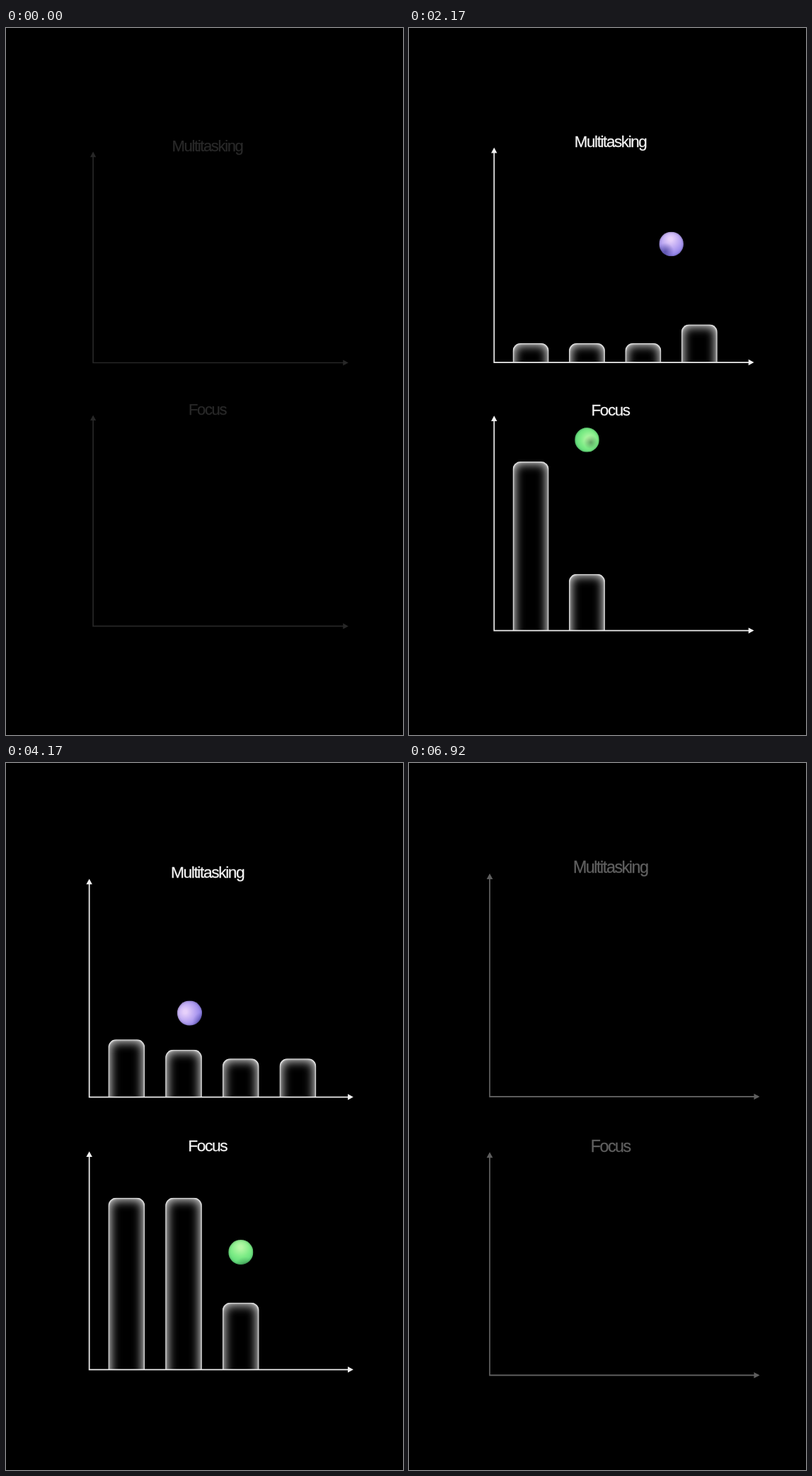
Animation, 561 px wide and 998 px high, one loop 7 s. Source, as an HTML page:

```html
<!DOCTYPE html>
<html lang="en">
<head>
<meta charset="utf-8">
<title>Multitasking and focus</title>
<style>
html, body { margin: 0; width: 100%; height: 100%; overflow: hidden; background: #000; }
#view { position: fixed; inset: 0; overflow: hidden; contain: strict; }
#stage { position: absolute; left: 0; top: 0; width: 561px; height: 998px; transform-origin: 280.5px 499px; }
#stage svg { position: absolute; left: 0; top: 0; }
.bar { position: absolute; width: 50.2px; overflow: hidden; }
.bar::before {
  content: ""; position: absolute; inset: 0 0 -34px; border-radius: 11px;
  box-shadow: inset 0 0 2px 1.2px rgba(255,255,255,.85), inset 0 0 13px 3.5px rgba(255,255,255,.8);
}
.ball { position: absolute; left: -17.1px; top: -17.1px; width: 34.2px; height: 34.2px; border-radius: 50%; }
text {
  font: 22px "Liberation Sans", Arial, sans-serif; letter-spacing: -1.35px; text-anchor: middle;
  fill: #f4f4f4; stroke: #f4f4f4; stroke-width: .25px;
}
</style>
</head>
<body>
<div id="view">
  <div id="stage">
    <div id="content"></div>
    <svg id="axes" width="561" height="998">
      <defs>
        <g id="axis">
          <path d="M123.1 180V472.5H478" fill="none" stroke="#ececec" stroke-width="1.7"/>
          <path d="M123.1 174.6l4.1 7.6h-8.2zM483.8 472.5l-7.6 4.1v-8.2z" fill="#f2f2f2"/>
        </g>
      </defs>
      <use href="#axis"/>
      <use href="#axis" y="371.9"/>
      <text x="284.5" y="173.7">Multitasking</text>
      <text x="284.5" y="546.3">Focus</text>
    </svg>
  </div>
</div>
<script>
const LOOP = 7000, UNIT = 26.1, PITCH = 78.1, LEFT = 148.8, RADIUS = 17;
const FLOORS = [472.5, 844.4];
const stage = document.getElementById('stage');
const content = document.getElementById('content');
const axes = document.getElementById('axes');

const clamp = v => Math.max(0, Math.min(1, v));
const add = name => {
  const el = content.appendChild(document.createElement('div'));
  el.className = name;
  return el;
};
const bars = FLOORS.map(() => [0, 1, 2, 3].map(() => add('bar')));
const balls = FLOORS.map(() => add('ball'));
const center = column => LEFT + 25.1 + column * PITCH;
const contact = (chart, level) => FLOORS[chart] - RADIUS - UNIT * level;

function drawBar(chart, column, level) {
  const { style } = bars[chart][column];
  const height = level * UNIT;
  style.left = LEFT + column * PITCH + 'px';
  style.top = FLOORS[chart] - height + 'px';
  style.height = height + 'px';
}

// A lit sphere whose highlight and shade slowly orbit.
function drawBall(chart, x, y, t) {
  const [light, tint, deep, shade] = chart
    ? ['#b6f8a6', '#7dec86', '#55d476', '#2a6a3a90']
    : ['#e6d0fa', '#b8a4f2', '#8377e4', '#2c288090'];
  const a = t * 2.2 + (chart ? 2 : 0);
  const hx = 46 + 14 * Math.cos(a), hy = 42 + 12 * Math.sin(a);
  const sx = 65 + 40 * Math.cos(a * .7), sy = 85 + 25 * Math.sin(a * .7);
  const { style } = balls[chart];
  style.transform = `translate(${x}px, ${y}px)`;
  style.background =
    `radial-gradient(circle at ${sx}% ${sy}%, ${shade} 0, transparent 32%),` +
    `radial-gradient(circle at ${hx}% ${hy}%, ${light} 8%, ${tint} 45%, ${deep} 85%)`;
  style.boxShadow = 'inset 0 0 3px rgba(0,0,0,.4)';
}

// Upper ball: even hops back and forth, one unit per landing.
const order = [0, 1, 2, 3, 3, 2, 1, 0, 0, 1, 2, 3, 3, 2, 1, 0];
function drawMultitasking(t) {
  const beat = (t - .2116) / .4344 + 1;
  const hop = Math.floor(beat), f = beat - hop;
  const levels = [0, 0, 0, 0];
  order.forEach((column, i) => levels[column] += clamp((beat - i - 1) / .22));
  levels.forEach((level, column) => drawBar(0, column, level));
  const from = Math.max(0, hop - 1), to = Math.min(15, hop);
  const ground = i => contact(0, Math.floor(i / 4));
  const mix = (a, b) => a + (b - a) * f;
  drawBall(0, mix(center(order[from]), center(order[to])),
    mix(ground(from), ground(to)) - 484 * f * (1 - f), t);
}

// Lower ball: free fall from a fixed apex, nine landings per column.
// One phase step is the square root of a pixel of fall.
const APEX = 565;
const fall = level => Math.sqrt(contact(1, level) - APEX);
const hits = [];
let clock = 0;
for (let i = 0; i < 36; i++) {
  clock += fall(i % 9);
  hits.push(clock);
  clock += fall(i % 9);
}
const CYCLE = clock / 4;
const pace = [[0, 28], [1, 160.8], [2.167, 316.5], [3.083, 432], [4.167, 549.3], [6, 825.9], [7, 977]];

function phaseAt(t) {
  const i = pace.findIndex(p => p[0] > t);
  const [t0, u0] = pace[i - 1], [t1, u1] = pace[i];
  return u0 + (u1 - u0) * (t - t0) / (t1 - t0);
}

function drawFocus(t) {
  const u = phaseAt(t);
  const levels = [0, 0, 0, 0];
  hits.forEach((h, i) => levels[Math.floor(i / 9)] += clamp((u - h) / 5.1));
  levels.forEach((level, column) => drawBar(1, column, level));
  const done = hits.filter(h => h <= u).length;
  const top = done ? hits[done - 1] + fall((done - 1) % 9) : 0;
  let y = APEX + (u - top) ** 2;
  if (done === 36 && u > top) y = Math.min(y, contact(1, 9));
  let column = 0;
  for (let i = 1; i < 4; i++) column += clamp((u - CYCLE * i + 14) / 23);
  drawBall(1, center(column), y, t);
}

function frame(now) {
  // The picture advances twelve times a second.
  const t = Math.floor((now % LOOP + 4) * .012) % 84 / 12;
  stage.style.transform = `scale(${1 + .0083 * t})`;
  axes.style.opacity = Math.min(clamp((t + .08) / .5), clamp((7.08 - t) / .42));
  content.style.opacity = Math.min(clamp(t / .25), clamp((6.91 - t) / .2));
  drawMultitasking(t);
  drawFocus(t);
}

const start = performance.now();
function tick() {
  frame(performance.now() - start);
  requestAnimationFrame(tick);
}
tick();
</script>
</body>
</html>
```
